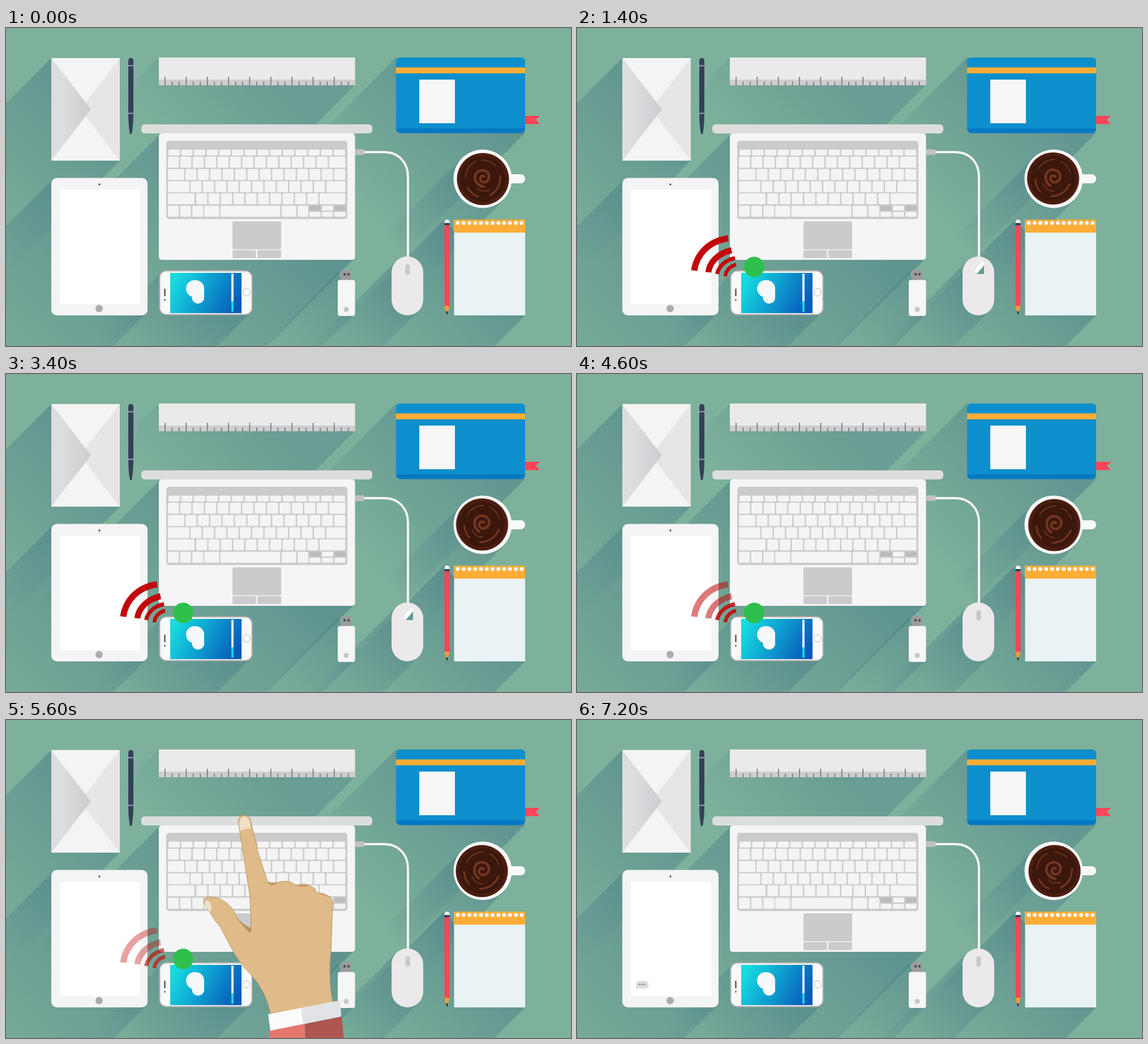
Animation of 998 by 561 pixels, one loop 8 s. Source, as an HTML page:

```html
<!DOCTYPE html>
<html lang="en">
<head>
<meta charset="utf-8">
<title>Desk</title>
<style>
  html, body { margin: 0; width: 100%; height: 100%; overflow: hidden; background: #7db19b; }
  svg { display: block; width: 100vw; height: 100vh; }
  .anim { animation: 8s linear infinite; }
  .cut { animation-timing-function: step-end; }

  #badge { animation-name: badge; }
  #outer { animation-name: fadeOuter; }
  #inner { animation-name: fadeInner; }
  .wave { animation-name: var(--in); }
  #glint { animation-name: glint; }
  #coffee { animation-name: slosh; }
  #swirl { animation-name: swirl; transform-origin: 842px 266px; }
  #hand { animation-name: reach; transform-origin: 421px 168px; }
  #handShow { animation-name: handShow; }
  #tap { animation-name: tap; }
  #typing { animation-name: typing; }

  @keyframes badge { 0% { opacity: 0 } 2.5%, 84.9% { opacity: 1 } 85%, 100% { opacity: 0 } }
  @keyframes in1 { 0% { opacity: 0 } 5%, 100% { opacity: 1 } }
  @keyframes in2 { 0% { opacity: 0 } 7.5%, 100% { opacity: 1 } }
  @keyframes in3 { 0% { opacity: 0 } 10%, 100% { opacity: 1 } }
  @keyframes in4 { 0% { opacity: 0 } 12.5%, 100% { opacity: 1 } }
  @keyframes fadeOuter {
    0%, 45% { opacity: 1 } 57.5% { opacity: .54 } 70% { opacity: .38 }
    80% { opacity: .22 } 85%, 100% { opacity: 0 }
  }
  @keyframes fadeInner {
    0%, 45% { opacity: 1 } 57.5% { opacity: .88 } 70% { opacity: .66 }
    80% { opacity: .26 } 85%, 100% { opacity: 0 }
  }
  @keyframes glint { 0% { opacity: 0 } 12.5% { opacity: 1 } 50%, 100% { opacity: 0 } }
  @keyframes slosh {
    0% { transform: translate(0, 0) } 17.5%, 42.5% { transform: translate(-1.5px, -1px) }
    57.5% { transform: translate(.5px, 0) } 70% { transform: translate(-2px, 0) }
    80% { transform: translate(-1.2px, 0) } 90%, 100% { transform: translate(1px, 0) }
  }
  @keyframes swirl {
    0% { transform: rotate(-28deg) } 17.5%, 80% { transform: rotate(0deg) }
    90%, 100% { transform: rotate(-26deg) }
  }
  @keyframes reach {
    0%, 67.5% { transform: translate(17px, -66px) scale(1.18) }
    70% { transform: translate(0, 0) scale(1) }
    80%, 100% { transform: translate(-67px, 276px) scale(.283) }
  }
  @keyframes handShow { 0% { opacity: 0 } 67.5% { opacity: 1 } 85%, 100% { opacity: 0 } }
  @keyframes tap { 0% { opacity: 0 } 80% { opacity: 1 } 85%, 100% { opacity: 0 } }
  @keyframes typing { 0% { opacity: 0 } 87.5%, 100% { opacity: 1 } }
</style>
</head>
<body>
<svg viewBox="0 0 998 561" preserveAspectRatio="none">
  <defs>
    <linearGradient id="flap"><stop offset=".3" stop-color="#dddcde"/><stop offset="1" stop-color="#cccbd0"/></linearGradient>
    <linearGradient id="screen" x1="0" y1=".35" x2="1" y2=".65">
      <stop offset="0" stop-color="#17dbdf"/><stop offset=".5" stop-color="#0d9bd0"/><stop offset="1" stop-color="#0759b8"/>
    </linearGradient>
  </defs>
  <rect width="998" height="561" fill="#7db19b"/>
  <g id="shadows"></g>

  <!-- envelope -->
  <path d="M80 53H201V234H80Z" fill="#f4f4f4"/>
  <path d="M201 53V234L131 143.500Z" fill="#e6e6e6"/>
  <path d="M80 53L150 143.500L80 234Z" fill="url(#flap)"/>

  <!-- pen -->
  <path d="M225 66H229V107" fill="none" stroke="#98a4b4" stroke-width="2"/>
  <path d="M216 58Q216 53 220.500 53T225 58V150Q225 172 222 187H219Q216 172 216 150Z" fill="#343f57"/>
  <path d="M215 66.500H230M216 150.500H225" stroke="#98a4b4" stroke-width="2"/>

  <!-- ruler -->
  <rect x="270" y="52" width="346.500" height="49" fill="#ebe9ea"/>
  <rect x="270" y="91" width="346.500" height="10" fill="#d0cdd0"/>
  <path id="ticks" stroke="#77747a" stroke-width="1.700"/>

  <!-- notebook -->
  <path d="M917 155H943L936 162L943 169.500H917Z" fill="#ff4458"/>
  <rect x="689" y="60" width="228" height="125.500" rx="8" fill="#0678c4"/>
  <path d="M689 60Q689 52 697 52H909Q917 52 917 60V177H689Z" fill="#0c8fcc"/>
  <rect x="689" y="69.500" width="228" height="10.500" fill="#ffad36"/>
  <rect x="730" y="91" width="63" height="77" fill="#f6f6f6"/>

  <!-- cup -->
  <rect x="880" y="258" width="37" height="16" rx="8" fill="#f8f8f8"/>
  <circle cx="842" cy="266" r="51.500" fill="#f8f8f8"/>
  <g id="coffee" class="anim">
    <circle cx="842.500" cy="266.500" r="46" fill="#4a1d0f"/>
    <circle cx="842.500" cy="266.500" r="40" fill="#3b170c"/>
    <g id="swirl" class="anim" fill="none" stroke="#743722" stroke-linecap="round">
      <path d="M846 263c-5-5-11 2-7 8c6 6 17 0 16-10c-2-11-18-14-24-4c-4 8-1 17 6 22" stroke-width="4.500"/>
      <path d="M839 298Q862 297 872 276M820 290Q812 282 811 268" stroke-width="3"/>
      <path d="M816 250Q826 233 845 233M856 236Q868 242 873 256M825 276Q830 288 843 289" stroke-width="1.800"/>
    </g>
  </g>

  <!-- laptop -->
  <rect x="239" y="170" width="408" height="16" rx="6" fill="#dddddd"/>
  <rect x="270" y="186" width="346.500" height="223" rx="5" fill="#f5f5f5"/>
  <rect x="283" y="199" width="320" height="138" rx="5" fill="#cbcbcb"/>
  <g id="keys" fill="#f4f4f4"></g>
  <g fill="#cbcbcb">
    <rect x="400" y="341" width="86" height="49.500" rx="3"/>
    <rect x="400" y="392" width="41.500" height="14" rx="2"/>
    <rect x="444" y="392" width="42" height="14" rx="2"/>
  </g>

  <!-- mouse -->
  <path d="M632 219H668C694 219 710 238 710 262V406" fill="none" stroke="#f4f4f4" stroke-width="4"/>
  <rect x="616.500" y="214" width="16.500" height="10" fill="#c2c0c1"/>
  <rect x="681" y="403" width="56" height="104" rx="28" fill="#ebe9ea"/>
  <rect x="705.500" y="417" width="8" height="18" rx="4" fill="#c9c7c9"/>
  <g id="glint" class="anim cut">
    <rect x="703" y="411" width="17" height="25" fill="#ebe9ea"/>
    <path d="M705 424L717 412L720 417L706 434L703 430Z" fill="#fff"/>
    <path d="M719 419V434H706Z" fill="#5f9c98"/>
  </g>

  <!-- tablet -->
  <rect x="80" y="264.500" width="170" height="242.500" rx="10" fill="#f4f4f4"/>
  <rect x="95" y="285.500" width="142" height="201.500" fill="#fff"/>
  <circle cx="165" cy="276" r="1.800" fill="#555"/>
  <circle cx="164.500" cy="495" r="6.500" fill="#acacac"/>
  <g id="typing" class="anim cut">
    <path d="M110 460H120A6.500 6.500 0 0 1 120 473.500H102.500Q105 471 104 467Q104 460 110 460Z" fill="#dcdce0"/>
    <g fill="#85858c"><circle cx="110.500" cy="466.700" r="1.400"/><circle cx="114.700" cy="466.700" r="1.400"/><circle cx="118.900" cy="466.700" r="1.400"/></g>
  </g>

  <!-- phone -->
  <rect x="271.500" y="428.500" width="163" height="77" rx="12" fill="#fafafa" stroke="#b8b2b2" stroke-width="2"/>
  <rect x="290" y="432" width="126" height="71" fill="url(#screen)"/>
  <path d="M336 445A15 15 0 0 1 350 458V478A11 11 0 0 1 328.500 477V474A15 15 0 0 1 336 445Z" fill="#f6f8fa"/>
  <path d="M400 433.500V482" stroke="#e9f2f7" stroke-width="4"/>
  <path d="M400 482V500.500" stroke="#1fd0e6" stroke-width="4"/>
  <path d="M280.500 460V473" stroke="#333" stroke-width="2"/>
  <circle cx="280.500" cy="479.500" r="1.300" fill="#333"/>
  <circle cx="425" cy="466.500" r="6.300" fill="#fff" stroke="#b5b0b0"/>

  <!-- usb stick -->
  <rect x="592" y="427" width="18" height="19" fill="#9c9c9e"/>
  <path d="M596 432.500h4v4h-4zM603 432.500h4v4h-4z" fill="#4b4b50"/>
  <rect x="586" y="444.500" width="30.500" height="63.500" rx="4" fill="#f6f6f6"/>
  <circle cx="601" cy="496.500" r="4.700" fill="#c8c8c8"/>

  <!-- pencil -->
  <path d="M774.500 345V342Q775 338 779 338T783.500 342V345Z" fill="#f4f4f4"/>
  <rect x="774.500" y="344" width="9" height="4" fill="#343f57"/>
  <rect x="774.500" y="348" width="9" height="142" fill="#ff4458"/>
  <path d="M774.500 490H783.500L779.500 506H778.500Z" fill="#f59a3c"/>
  <path d="M777 500H781L779 507Z" fill="#333"/>

  <!-- notepad -->
  <rect x="791.500" y="338" width="125.500" height="169" fill="#e9f2f4"/>
  <rect x="791.500" y="338" width="125.500" height="23" fill="#ffad36"/>
  <g id="holes" fill="#f5f5f5"></g>

  <!-- signal -->
  <g fill="none" stroke="#c2080c">
    <g id="outer" class="anim">
      <path class="anim cut wave" style="--in:in4" d="M207 428C211 400 232 376 267 371" stroke-width="11"/>
      <path class="anim cut wave" style="--in:in3" d="M232 431C234 413 250 397 273 392" stroke-width="10.500"/>
    </g>
    <g id="inner" class="anim">
      <path class="anim cut wave" style="--in:in2" d="M247.500 434C250 421 262 409 279 406" stroke-width="7"/>
      <path class="anim cut wave" style="--in:in1" d="M262 438C263 428 270 420 281 417.500" stroke-width="6.500"/>
    </g>
  </g>
  <circle id="badge" class="anim cut" cx="313" cy="421.500" r="18" fill="#2fbf4c"/>

  <g id="tap" class="anim cut">
    <circle cx="350" cy="447" r="14.500" fill="#8fa9c4" opacity=".6"/>
    <circle cx="350" cy="447" r="9" fill="#7f9fbd" opacity=".55"/>
  </g>

  <!-- hand -->
  <g id="handShow" class="anim cut"><g id="hand" class="anim">
    <path d="M465 548L528 536L530 660H470Z" fill="#e6776d"/>
    <path d="M528 536L593 523L606 660H530Z" fill="#ad5652"/>
    <path d="M411 185C409 173 414 168 421 168C429 168 433 175 434 186L446 236L462 285Q466 293 473 291
      Q487 281 503 286Q509 288 511 292Q532 286 546 298L549 305Q577 308 577 322L574 410
      Q570 440 574 480L578 500L467 518Q460 478 430 446Q411 428 397 400L378 364Q368 354 362 342
      L351 326Q347 314 357 312Q374 311 390 323Q403 334 408 348Q418 365 432 375Q434 352 430 305Z"
      fill="#dfbb89" stroke="#b98f5b" stroke-width="1"/>
    <path d="M408 348Q418 365 432 375L434 350Q434 366 430 366Q420 362 408 348Z" fill="#b98f5b"/>
    <path d="M462 285Q466 293 473 291L485 285Q473 288 462 285ZM511 292Q525 287 536 291Q528 297 511 292ZM549 305Q562 303 572 313Q562 309 549 305Z" fill="#c79d68"/>
    <path d="M413 196Q410 175 417 171Q427 168 431 180L432 192Q423 191 413 196Z" fill="#efdfc6"/>
    <path d="M351 320Q353 316 358 319Q364 326 363 335L360 339L351 326Z" fill="#efdfc6"/>
    <path d="M463 519L590 495L592 523L467 548Z" fill="#fcfcfc"/>
    <path d="M521 508L590 495L592 523L525 536Z" fill="#e2e3e6"/>
  </g></g>
</svg>
<script>
  const $ = id => document.getElementById(id);
  const LOOP = 8000, STEP = 200;

  // Long shadow cast down and to the left of a box.
  let shadowCount = 0;
  function shadow(x, y, w, h, len = 130, alpha = .55, r = 0) {
    const id = 'sh' + shadowCount++, cut = r * .29, far = 700;
    const cx = x + w / 2, cy = y + h / 2, reach = (w + h) / 4 + len;
    const ax = x + cut, ay = y + cut, bx = x + w - cut, by = y + h - cut;
    return `<linearGradient id="${id}" gradientUnits="userSpaceOnUse" x1="${cx}" y1="${cy}" x2="${cx - reach}" y2="${cy + reach}">
      <stop stop-color="#4d8088" stop-opacity="${alpha}"/><stop offset="1" stop-color="#4d8088" stop-opacity="0"/></linearGradient>
      <path d="M${ax} ${ay}L${bx} ${by}l${-far} ${far}L${ax - far} ${ay + far}Z" fill="url(#${id})"/>`;
  }
  $('shadows').innerHTML = [
    shadow(80, 53, 121, 181),
    shadow(270, 52, 346, 49, 50, .4),
    shadow(689, 52, 228, 133, 100),
    shadow(270, 186, 346, 223, 110, .6, 5),
    shadow(80, 264, 170, 243, 130, .5, 10),
    shadow(271, 428, 164, 78, 80, .5, 12),
    shadow(791, 215, 103, 103, 90, .55, 51),
    shadow(774, 338, 143, 169, 100, .6),
    shadow(681, 403, 56, 104, 110, .5, 28),
    shadow(586, 428, 30, 79, 100, .5, 4)
  ].join('');

  let ticks = '';
  for (let i = 0; i < 27; i++) ticks += `M${281 + i * 12.45} ${i % 3 ? 94.5 : 86}V101`;
  $('ticks').setAttribute('d', ticks);

  const key = (x, y, w, h, fill = '#f4f4f4') =>
    `<rect x="${x}" y="${y}" width="${w}" height="${h}" rx="2" fill="${fill}"/>`;
  const run = (x, y, n, pitch, h = 19.5) =>
    Array.from({ length: n }, (_, i) => key(x + i * pitch, y, pitch - 2.4, h)).join('');
  $('keys').innerHTML = [
    run(287, 214.5, 14, 22.45, 10.5),
    run(286, 227, 13, 21.9), key(570.5, 227, 29, 19.5),
    key(286, 248.700, 29, 19.5), run(317, 248.700, 12, 21.9), key(579.500, 248.700, 20, 19.5),
    key(286, 270.300, 38, 19.5), run(326, 270.300, 11, 21.8), key(566, 270.300, 33.500, 19.5),
    key(286, 291.500, 47, 19.5), run(336, 291.500, 10, 21.8), key(554, 291.500, 45.500, 19.5),
    run(286, 313.500, 3, 21.6), key(350, 313.500, 26.500, 19.5), key(378.500, 313.500, 106, 19.5),
    key(487, 313.500, 25.500, 19.5), key(515, 313.500, 19, 19.5),
    key(536, 313.500, 20, 8.500, '#bcbcbc'), key(580, 313.500, 19.500, 8.500, '#bcbcbc'),
    key(558, 313.500, 20, 8.500), run(536, 324.300, 3, 22, 8.700)
  ].join('');

  $('holes').innerHTML = Array.from({ length: 12 }, (_, i) =>
    `<circle cx="${798 + i * 10.25}" cy="344" r="3.500"/>`).join('');

  // The picture advances in whole steps.
  const anims = document.getAnimations();
  anims.forEach(a => a.pause());
  const start = performance.now();
  function draw() {
    const t = Math.floor((performance.now() - start) % LOOP / STEP) * STEP;
    anims.forEach(a => a.currentTime = t);
    requestAnimationFrame(draw);
  }
  draw();
</script>
</body>
</html>
```
